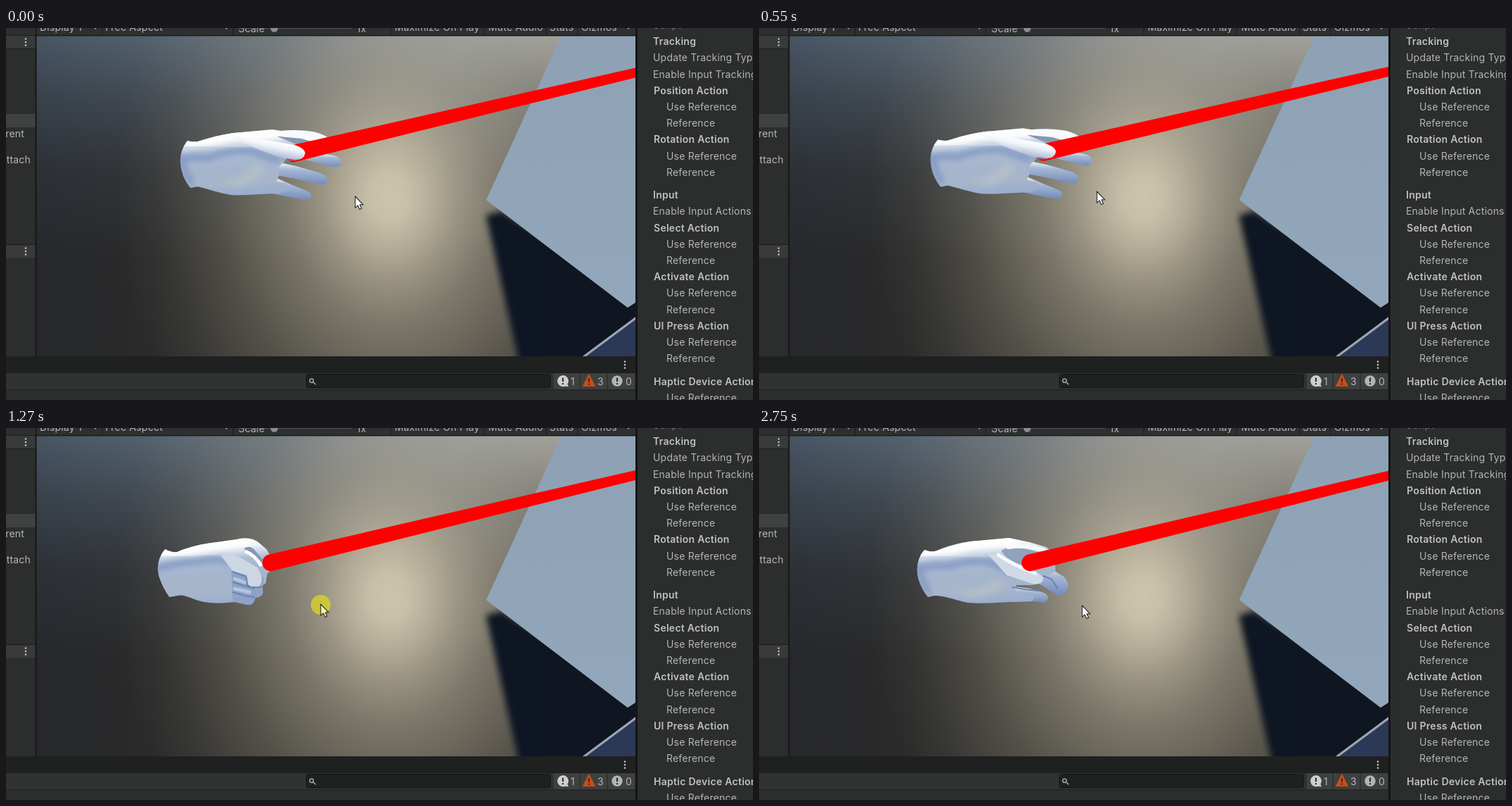
These frames come from a looping animation (1061 by 528 pixels, 3.45 s). An HTML page:

```html
<!DOCTYPE html>
<html lang="en">
<head>
<meta charset="utf-8">
<title>Hand ray interactor</title>
<style>
html, body { margin: 0; width: 100%; height: 100%; overflow: hidden; background: #2c2e2e; }
svg { position: absolute; left: 0; top: 0; width: 1061px; height: 528px; display: block; }
.wall {
  position: absolute; left: 43px; top: 11px; width: 852px; height: 456px;
  background: linear-gradient(90deg, #26282c, #2a2a2a 20%, #33322f 35%, #3a3831 58%, #3a3833 75%);
}
.wall::before, .wall::after { content: ""; position: absolute; inset: 0; }
.wall::before {
  background: linear-gradient(90deg, #485664, #54616e 18%, #5c6873 30%, #626d79 42%, #7a8086 58%, #8a9195 71%, #9d9d98 85%);
  -webkit-mask-image: linear-gradient(#000, rgba(0,0,0,.56) 20%, rgba(0,0,0,.2) 42%, transparent 70%);
  mask-image: linear-gradient(#000, rgba(0,0,0,.56) 20%, rgba(0,0,0,.2) 42%, transparent 70%);
}
.wall::after {
  background: radial-gradient(390px 488px at 502px 229px,
    rgba(205,196,172,1), rgba(205,196,172,.96) 7%, rgba(205,196,172,.79) 17%, rgba(205,196,172,.65) 24%,
    rgba(205,196,172,.45) 37%, rgba(205,196,172,.2) 62%, rgba(205,196,172,.07) 82%, rgba(205,196,172,0));
}
text { font: 14px Inter, "Open Sans", sans-serif; letter-spacing: .2px; fill: #b5b5b5; }
.b { font-weight: 600; letter-spacing: .27px; fill: #c0c0c0; }
.dim { fill: #777; }
.crease { fill: none; stroke: #6a83b2; stroke-width: 2; stroke-linecap: round; stroke-linejoin: round; }
.shade { fill: none; stroke: #8299c2; stroke-width: 9; filter: url(#soft); }
.shine { fill: none; stroke: #fff; stroke-width: 12; filter: url(#soft); }
</style>
</head>
<body>
<div class="wall"></div>
<svg viewBox="0 0 1061 528">
  <defs>
    <linearGradient id="skin" gradientUnits="userSpaceOnUse" x1="315" y1="145" x2="322" y2="240">
      <stop offset="0" stop-color="#fff"/><stop offset=".13" stop-color="#f0f3f8"/>
      <stop offset=".32" stop-color="#acbcd5"/><stop offset=".55" stop-color="#a5b5cc"/>
      <stop offset=".8" stop-color="#a6b5ca"/><stop offset="1" stop-color="#98acce"/>
    </linearGradient>
    <linearGradient id="skinLow" href="#skin" gradientTransform="translate(-23 13)"/>
    <linearGradient id="finger" x1=".4" y1="0" x2=".3" y2="1">
      <stop offset=".08" stop-color="#e9eef5"/><stop offset=".35" stop-color="#a6b8d5"/><stop offset="1" stop-color="#6f88b9"/>
    </linearGradient>
    <linearGradient id="thumb" gradientUnits="userSpaceOnUse" x1="385" y1="160" x2="380" y2="186">
      <stop offset="0" stop-color="#fff"/><stop offset=".35" stop-color="#eff3f8"/><stop offset="1" stop-color="#96aacb"/>
    </linearGradient>
    <linearGradient id="cube" x1="0" y1="0" x2="0" y2="1">
      <stop offset="0" stop-color="#8ea1b4"/><stop offset="1" stop-color="#93a7bc"/>
    </linearGradient>
    <filter id="soft" x="-30%" y="-30%" width="160%" height="160%"><feGaussianBlur stdDeviation="4"/></filter>
    <clipPath id="view"><rect x="43" y="11" width="851" height="455"/></clipPath>
    <clipPath id="palmClip"><use href="#palm"/></clipPath>
    <clipPath id="fistClip"><use href="#fistShape"/></clipPath>
    <clipPath id="gripClip"><use href="#gripShape"/></clipPath>
  </defs>

  <g clip-path="url(#view)">
    <path d="M682 266L704 260L900 385V480H730Z" fill="#101620" filter="url(#soft)"/>
    <path d="M760 310L883 396L894 388V466H760Z" fill="#101621"/>
    <path d="M820 467L896 410V467Z" fill="#2b3957"/>
    <path d="M820 467L896 410.5" stroke="#9ca6b3" stroke-width="3.2"/>
    <path d="M789 11L682 244L883 397L895 389V11Z" fill="url(#cube)"/>

    <g class="open">
      <path d="M372 149C395 143 425 145 440 148Q455 152 463 160L452 166L420 158L385 154Z" fill="#f8f9fc"/>
      <path d="M378 153L420 157L440 163L425 172L390 166Z" fill="#8797b0"/>
      <path d="M415 176L445 177L466 181Q476 184 476 190Q475 199 465 197L425 187Z" fill="url(#finger)"/>
      <path d="M385 190L412 196L444 205Q457 209 457 217Q455 224 446 222L411 214L384 209Z" fill="url(#finger)"/>
      <path d="M382 212L407 223L427 231Q435 234 434 240Q431 245 424 244L402 240L378 235Z" fill="url(#finger)"/>
      <path id="palm" d="M258 160Q268 163 276 160C295 154 315 149 335 148L378 144L398 147L385 154L420 168L398 186Q395 191 389 195Q386 201 388 208L384 218L398 220L404 230L387 235C365 235 345 238 320 237C302 234 285 228 272 225L262 227Q252 215 249 200Q244 176 258 160Z" fill="url(#skin)"/>
      <g clip-path="url(#palmClip)">
        <path class="shade" d="M244 190Q258 181 285 185Q315 173 345 174L390 188"/>
        <path class="shine" d="M246 163Q285 165 320 153L392 150"/>
        <path d="M300 215Q330 222 352 192L370 198Q360 215 330 226Z" fill="#b3bec9" filter="url(#soft)"/>
        <path class="shade" d="M251 185Q253 208 265 222"/>
      </g>
    </g>

    <g id="fist">
      <path id="fistShape" d="M226 172Q235 177 243 176C262 168 280 164 300 162L328 158Q345 154 357 161L370 172L377 184L378 200L371 207L369 220L364 224L365 234Q363 240 354 241Q352 252 343 251L325 247C305 249 290 250 270 244Q252 236 244 238L232 240Q222 226 217 210Q212 188 226 172Z" fill="url(#skinLow)"/>
      <g clip-path="url(#fistClip)">
        <path class="shade" d="M213 200Q245 190 270 190Q300 182 325 192L345 205"/>
        <path class="shine" d="M216 177Q260 177 290 167L345 161"/>
        <path d="M320 202L366 212L364 238L346 252L322 246Z" fill="#8da2c8"/>
      </g>
      <path d="M338 171Q346 166 352 172L365 187L360 194L350 184Z" fill="#8497b6"/>
      <path d="M302 177Q320 176 335 185L357 198Q366 211 362 222Q354 231 344 224L342 209L322 203Z" fill="#cdd7e4"/>
      <path d="M340 175Q353 180 363 196" fill="none" stroke="#fff" stroke-width="5"/>
      <path class="crease" d="M322 204L341 211L343 223L352 228M323 219L345 226L362 226M322 233L339 238L352 240"/>
      <path d="M325 214L339 219M325 228L346 233" stroke="#b5c4da" stroke-width="5" stroke-linecap="round"/>
    </g>

    <g id="grip">
      <path d="M355 224L385 228L405 234Q412 238 410 244Q407 249 398 247L350 242Z" fill="url(#finger)"/>
      <path d="M390 194L418 202L433 211Q441 220 439 227Q434 238 423 237L406 226L392 218Z" fill="url(#finger)"/>
      <path id="gripShape" d="M235 173Q245 177 253 174C272 166 292 161 312 160L355 156L384 162L408 169Q418 176 421 190L421 204L404 212L402 220L388 223L366 223Q360 227 367 233L392 239L388 246L364 247C340 247 322 250 297 248C278 244 265 238 249 238L240 240Q230 228 226 213Q221 188 235 173Z" fill="url(#skinLow)"/>
      <g clip-path="url(#gripClip)">
        <path class="shade" d="M221 202Q250 193 270 196Q300 185 330 191L365 207"/>
        <path class="shine" d="M224 176Q270 178 300 166L365 160"/>
        <path d="M275 230Q310 235 340 214L350 221Q330 240 300 240Z" fill="#b3bec9" filter="url(#soft)"/>
        <path class="shade" d="M228 198Q230 221 242 235"/>
      </g>
      <path d="M344 174Q356 166 375 170L402 178L400 190L378 196Q352 188 344 174Z" fill="#91a2bc"/>
      <path d="M354 169Q380 165 405 174" fill="none" stroke="#f7f9fc" stroke-width="6" stroke-linecap="round"/>
      <path d="M325 179Q342 177 356 188L382 201Q402 206 404 214Q402 223 388 221L352 209Z" fill="#d0dae7"/>
      <path d="M340 180Q360 194 392 206" fill="none" stroke="#f8fafd" stroke-width="5" stroke-linecap="round"/>
      <path class="crease" d="M404 210L416 215L424 228M360 226Q378 230 397 231"/>
    </g>

    <path id="ray" fill="#f00"/>

    <g class="open">
      <path d="M318 153Q350 155 375 160L405 165Q424 169 425 178Q423 187 412 187L394 185Q372 178 350 169Z" fill="url(#thumb)"/>
      <path d="M392 187L412 187.5" stroke="#7f92b4"/>
    </g>

    <circle id="click" r="14" fill="#d6d32a" opacity=".8"/>
    <path id="cursor" d="M0 0V16.2L3.7 12.8L6.2 18.4L9 17.2L6.6 11.8H11.3Z" stroke="#222" stroke-width="1.1" stroke-linejoin="round"/>
  </g>

  <!-- editor chrome -->
  <rect width="895" height="10" fill="#2e3030"/>
  <rect y="10" width="895" height="1.5" fill="#191a1a"/>
  <g id="topBar"></g>
  <rect x="330" y="0" width="162" height="1" fill="#555"/>
  <circle cx="381" cy="1" r="5" fill="#8c8c8c"/>

  <rect y="11" width="42" height="456" fill="#2c2d2d"/>
  <path d="M0 11H42V29H0ZM0 308H42V326H0Z" fill="#393a3a"/>
  <rect y="122" width="42" height="19" fill="#404141"/>
  <path d="M0 10.5H42M0 29.5H42M0 307.5H42" stroke="#1b1b1b"/>
  <rect x="41.5" width="2" height="467" fill="#161717"/>
  <text x="26" y="155" text-anchor="end">Parent</text>
  <text x="35" y="192" text-anchor="end">Attach</text>

  <rect y="466" width="895" height="62" fill="#1f2020"/>
  <rect y="490" width="895" height="23" fill="#313232"/>
  <rect y="514" width="895" height="14" fill="#2c2d2d"/>
  <rect x="426.5" y="491.5" width="347" height="19" rx="3" fill="#1f2020" stroke="#151616"/>
  <g fill="none" stroke="#b5b5b5" stroke-width="1.3"><circle cx="434" cy="500.5" r="2.7"/><path d="M436 502.5L440 506"/></g>
  <path d="M778 490H814V513H778ZM816 490H853V513H816ZM855 490H893V513H855Z" fill="#3f4040"/>
  <path d="M791 493A8 8 0 1 0 794 508.5L799 509L797.5 505.5A8 8 0 0 0 791 493Z" fill="#cdcfd0"/>
  <path d="M828 492L836 508H820Z" fill="#cc4d14" stroke="#cc4d14" stroke-width="1.5" stroke-linejoin="round"/>
  <circle cx="868" cy="501" r="7.7" fill="#b3b4b4"/>
  <path d="M791 496.5V502M791 504V506M828 497V502.5M828 504.5V506.5M868 496.5V502M868 504V506" stroke="#2f3030" stroke-width="2.2"/>
  <text x="802" y="506.5">1</text><text x="840" y="506.5">3</text><text x="880" y="506.5">0</text>
  <g id="dots" fill="#c4c4c4"></g>

  <rect x="894" width="3" height="528" fill="#141515"/>
  <rect x="897" width="164" height="528" fill="#2b2e2d"/>
  <g id="inspector"></g>
</svg>
<script>
const $ = id => document.getElementById(id);
const svgNS = 'http://www.w3.org/2000/svg';

function add(parent, tag, attrs, content) {
  const el = document.createElementNS(svgNS, tag);
  for (const k in attrs) el.setAttribute(k, attrs[k]);
  if (content) el.textContent = content;
  $(parent).append(el);
}

// Static labels
[['Display 1', 48, 4], ['Free Aspect', 141, 4], ['Scale', 330, 6], ['1x', 498, 6], ['Maximize On Play', 552, 4],
 ['Mute Audio', 685, 4], ['Stats', 772, 4], ['Gizmos', 817, 4]]
  .forEach(([s, x, y]) => add('topBar', 'text', { x, y }, s));
for (const x of [136, 322, 546, 678, 767, 811])
  add('topBar', 'rect', { x, y: 0, width: 1, height: 10, fill: '#1a1b1b' });
for (const x of [127, 313, 884])
  add('topBar', 'path', { d: `M${x - 3} -2h6l-3 4z`, fill: '#aaa' });
for (const [x, y] of [[28, 20], [28, 317], [879, 478]])
  for (const d of [-4.5, 0, 4.5]) add('dots', 'circle', { cx: x, cy: y + d, r: 1.3 });

const label = (s, x, y, c = '') => add('inspector', 'text', { x, y: y + 5, class: c }, s);
function action(name, y) {
  label(name, 920, y, 'b');
  label('Use Reference', 938, y + 23.2);
  label('Reference', 938, y + 46.3);
}
label('Script', 919, -4, 'dim');
label('Tracking', 919, 19, 'b');
label('Update Tracking Type', 919, 42.3);
label('Enable Input Tracking', 919, 65.5);
action('Position Action', 88.7);
action('Rotation Action', 158.3);
label('Input', 919, 237, 'b');
label('Enable Input Actions', 919, 260.3);
action('Select Action', 283.7);
action('Activate Action', 353.2);
action('UI Press Action', 422.7);
action('Haptic Device Action', 501.7);

// time, hand dx, hand dy, ray height at right edge, cursor x, cursor y
const keys = [
  [0, 0, 0, 63.5, 496, 239],
  [160, -11, 46, 85, 470, 358],
  [310, 20, -20, 54, 541, 185],
  [550, -4, -1.5, 62, 480, 232],
  [1030, -25, 10.5, 67, 457, 247],
  [1270, -32, 13, 67, 447, 250],
  [1900, -32, 13, 67, 447, 250],
  [1980, -24, 13, 67.5, 458, 251],
  [2130, -23, 13, 67.8, 459, 252],
  [3450, -23, 13, 67.8, 459, 252]
];
const LOOP = 3450;
const ticks = [0, 80, 160];
for (let t = 230; t <= 1270; t += 80) ticks.push(t);
ticks.push(1900, 1980, 2130, 2750);

// A quick shake down and up, then a steady drift to rest
function sample(t) {
  const i = keys.findIndex(k => k[0] > t);
  const a = keys[i - 1], b = keys[i];
  let u = (t - a[0]) / (b[0] - a[0]);
  if (t < 310) u = u * u * (3 - 2 * u);
  return a.map((v, j) => v + (b[j] - v) * u);
}

function rayPath(x, y, endY) {
  const dx = 894 - x, dy = endY - y, len = Math.hypot(dx, dy);
  const nx = -dy / len, ny = dx / len;
  const ex = x + dx * 1.02, ey = y + dy * 1.02, r = 12, w = 6.7;
  return `M${x + nx * r} ${y + ny * r}L${ex + nx * w} ${ey + ny * w}` +
    `L${ex - nx * w} ${ey - ny * w}L${x - nx * r} ${y - ny * r}A${r} ${r} 0 0 0 ${x + nx * r} ${y + ny * r}Z`;
}

const openParts = document.querySelectorAll('.open');
const show = (el, on) => { el.style.display = on ? '' : 'none'; };

function draw(now) {
  const time = now % LOOP;
  const t = ticks.filter(k => k <= time).pop();
  const [, dx, dy, endY, cx, cy] = sample(t);
  const fist = t === 1270, grip = t === 2750;

  // perspective: the hand widens and tilts up as it moves left of the wrist pivot
  const stretch = 1 - dx * 0.001, tilt = dx * 0.0006, pivot = 247;
  const pose = [stretch, tilt, 0, 1, pivot * (1 - stretch) + dx, dy - pivot * tilt];
  openParts.forEach(g => {
    show(g, !fist && !grip);
    g.setAttribute('transform', `matrix(${pose})`);
  });
  show($('fist'), fist);
  show($('grip'), grip);
  show($('click'), fist);
  $('ray').setAttribute('d', rayPath(408 + dx, 178.2 + dy, endY));
  $('click').setAttribute('transform', `translate(${cx} ${cy + 1})`);
  $('cursor').setAttribute('transform', `translate(${cx} ${cy})`);
  $('cursor').setAttribute('fill', fist ? '#f7f4ae' : '#fff');
}

const start = performance.now();
function loop() {
  draw(performance.now() - start);
  requestAnimationFrame(loop);
}
loop();
</script>
</body>
</html>
```
